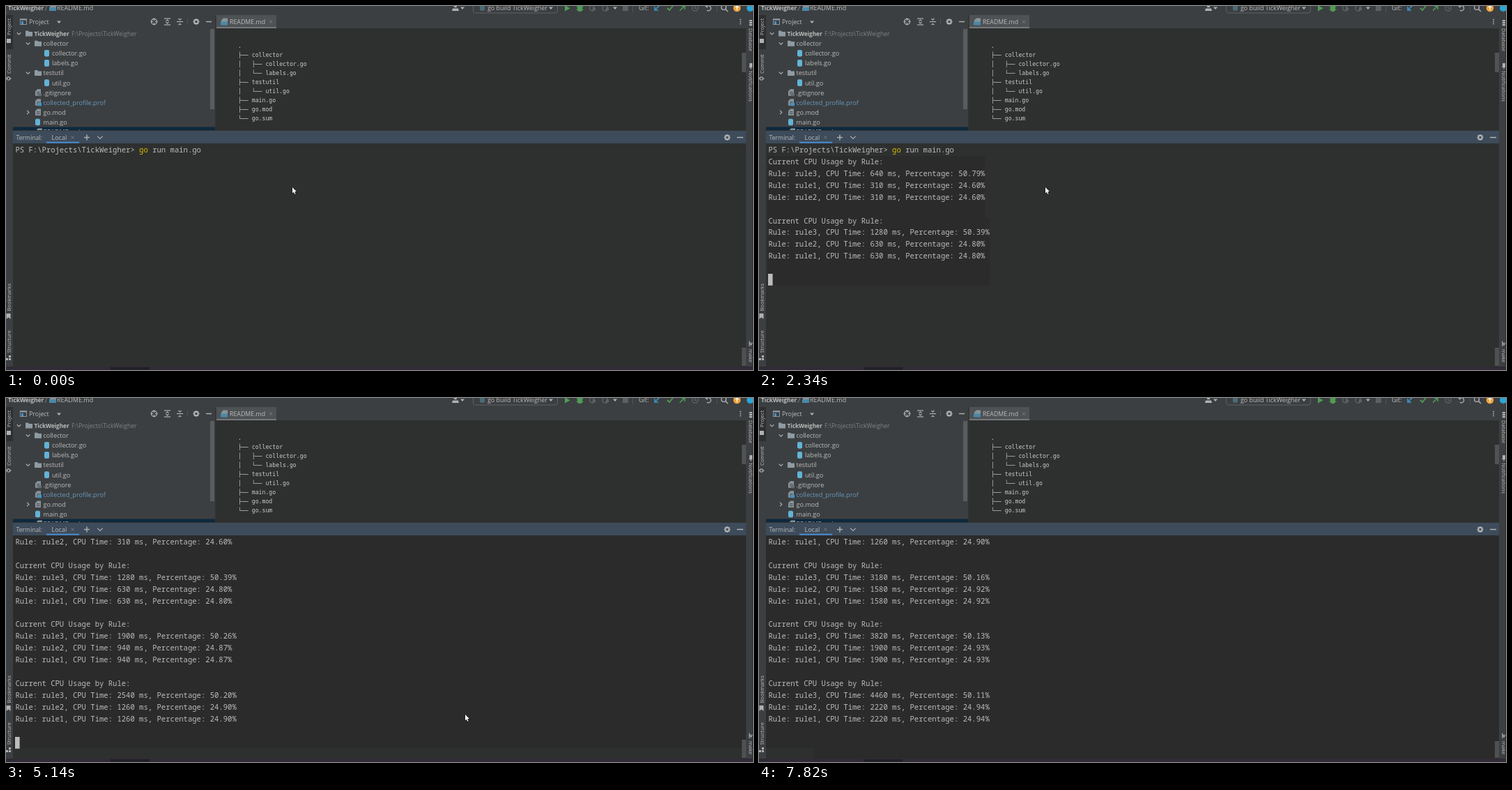
Write an HTML page with a canvas that moves like this. It is 1072 by 522 pixels and loops after 8 s.

```html
<!DOCTYPE html>
<html lang="en">
<head>
<meta charset="utf-8">
<title>Terminal run</title>
<style>
html, body { margin: 0; width: 100%; height: 100%; overflow: hidden; background: #3c3f41; }
canvas { display: block; width: 1072px; height: 522px; }
</style>
</head>
<body>
<canvas id="stage"></canvas>
<script>
const W = 1072, H = 522, LOOP = 8000;
const canvas = document.getElementById('stage');
const ratio = window.devicePixelRatio || 1;
canvas.width = W * ratio;
canvas.height = H * ratio;
const c = canvas.getContext('2d');
c.scale(ratio, ratio);

const UI = '"Open Sans", "Noto Sans", sans-serif';
const MONO = '"Noto Sans Mono", "DejaVu Sans Mono", monospace';
const TREE = '"DejaVu Sans Mono", monospace';
const NAME = 'TickWeigher';
const PANEL = '#3c3f41', BASE = '#2e302f', DARK = '#2b2b2b';
const TEXT = '#bbbbbb', ICON = '#afb1b3', DIM = '#616466';
const BLUE = '#3d94c9', GREEN = '#4f9d55';

// Timeline in ms
const blocks = [1480, 2340, 3320, 4420, 5270, 6270, 7270];
const blinks = [150, 610, 1200, 1910, 2340, 3870, 4420, 5870, 6270, 7820];
const pointer = [
  [0, 411, 260], [3740, 452, 297], [3870, 540, 458], [4000, 562, 460],
  [4270, 563, 459], [4420, 584, 459], [4540, 604, 459], [4690, 610, 459],
  [4840, 612, 459], [5140, 659, 454], [5270, 697, 449], [5420, 729, 443],
  [5570, 735, 441], [5720, 757, 439]
];
const POINTER_END = 5870;
// Areas repainted in the darker shade: time, left, top, right, bottom
const repaints = [
  [1480, 13, 215, 325, 316], [2340, 13, 304, 331, 401], [3320, 13, 384, 331, 486],
  [3740, 411, 259, 459, 307], [3870, 13, 296, 547, 486], [4420, 10, 197, 1062, 502],
  [5270, 78, 502, 1062, 517]
];

function rect(x, y, w, h, color) {
  c.fillStyle = color;
  c.fillRect(x, y, w, h);
}

function round(x, y, w, h, r, color) {
  c.fillStyle = color;
  c.beginPath();
  c.roundRect(x, y, w, h, r);
  c.fill();
}

function trace(p) {
  c.beginPath();
  for (let i = 0; i < p.length; i += 2) c.lineTo(p[i], p[i + 1]);
}

function line(p, color = ICON, width = 1.2) {
  trace(p);
  c.strokeStyle = color;
  c.lineWidth = width;
  c.stroke();
}

function poly(p, color = ICON) {
  trace(p);
  c.fillStyle = color;
  c.fill();
}

function disc(x, y, r, color = ICON) {
  c.beginPath();
  c.arc(x, y, r, 0, 7);
  c.fillStyle = color;
  c.fill();
}

function ring(x, y, r, color = ICON, width = 1.2, from = 0, to = 2 * Math.PI) {
  c.beginPath();
  c.arc(x, y, r, from, to);
  c.strokeStyle = color;
  c.lineWidth = width;
  c.stroke();
}

function text(s, x, y, size = 9.1, color = TEXT, family = UI, weight = 400) {
  c.font = `${weight} ${size}px ${family}`;
  c.fillStyle = color;
  c.fillText(s, x, y);
}

function sideText(s, x, y, turn, color = TEXT) {
  c.save();
  c.translate(x, y);
  c.rotate(turn * Math.PI / 2);
  text(s, 0, 0, 7.5, color);
  c.restore();
}

function chevron(x, y, r, down, color = ICON) {
  line(down ? [x - r, y - r / 2, x, y + r / 2, x + r, y - r / 2]
            : [x - r / 2, y - r, x + r / 2, y, x - r / 2, y + r], color);
}

function caret(x, y) {
  poly([x - 3, y - 1.5, x + 3, y - 1.5, x, y + 2]);
}

function cross(x, y) {
  line([x - 2, y - 2, x + 2, y + 2], '#7f8487', 0.9);
  line([x + 2, y - 2, x - 2, y + 2], '#7f8487', 0.9);
}

function gear(x, y) {
  ring(x, y, 2.7, ICON, 2);
  for (let i = 0; i < 8; i++) {
    const a = i * Math.PI / 4, u = Math.cos(a), v = Math.sin(a);
    line([x + 3 * u, y + 3 * v, x + 4.6 * u, y + 4.6 * v], ICON, 1.5);
  }
}

function folder(x, y) {
  poly([x, y - 4, x + 4, y - 4, x + 5.2, y - 2.6, x + 10, y - 2.6, x + 10, y + 4, x, y + 4], '#8f9ba3');
}

function page(x, y, badge) {
  poly([x + 3, y - 5, x + 8, y - 5, x + 8, y + 4.5, x, y + 4.5, x, y - 2], '#87939a');
  line([x + 2, y - 0.5, x + 6.5, y - 0.5], PANEL, 0.9);
  line([x + 2, y + 2, x + 6.5, y + 2], PANEL, 0.9);
  if (badge) rect(x + 4, y + 0.5, 5, 4.5, badge);
}

function codeFile(x, y, color = '#62b3d6') {
  round(x, y - 4.8, 7, 9.6, 2, color);
}

function docFile(x, y) {
  poly([x + 4, y - 5, x + 10, y - 5, x + 10, y + 1, x + 1, y + 1, x + 1, y - 2], '#87939a');
  rect(x, y, 10, 5, '#4a88a8');
}

function toolbar() {
  text(NAME, 3, 6, 8.4, TEXT, UI, 700);
  line([56, 7, 59, -1], '#777a7c', 1);
  docFile(62, 2);
  text('README.md', 73, 6, 9);

  disc(645, 0, 2.3);
  poly([640, 7, 641, 3.5, 649, 3.5, 650, 7]);
  caret(655, 3);
  c.beginPath();
  c.roundRect(670.5, -8, 121, 18, 3);
  c.strokeStyle = '#5e6163';
  c.lineWidth = 1;
  c.stroke();
  codeFile(680, 2, '#4c6a76');
  text('go build ' + NAME, 691, 6.3, 8.9);
  caret(782, 3);

  poly([802, -1, 802, 7.5, 809.5, 3.2], GREEN);
  round(820, -1, 7, 9, 3, GREEN);
  line([818.5, 1, 828.5, 1], GREEN);
  line([818.5, 5, 828.5, 5], GREEN);
  ring(841, 3, 3.5, DIM, 1.4);
  poly([842, 1, 842, 8, 847, 4.5], DIM);
  ring(860, 3, 4, DIM, 1.4);
  poly([861, 1, 861, 8, 866, 4.5], DIM);
  caret(874, 3);
  rect(885, 0, 8, 7, '#5d6062');
  line([899.5, 0, 899.5, 9], '#505355', 1);
  text('Git:', 908, 6, 9);
  line([938, -1, 931, 6], BLUE, 1.6);
  line([931, 1, 931, 6, 936, 6], BLUE, 1.6);
  line([949, 3, 952, 6, 957, 0], GREEN, 1.8);
  line([967, 6.5, 974, -0.5], GREEN, 1.6);
  line([969, 0, 974, 0, 974, 5], GREEN, 1.6);
  ring(989, 3, 4.2, DIM);
  line([989, 0, 989, 3.5, 991.5, 3.5], DIM);
  ring(1008, 3.2, 3.6, ICON, 1.3, -1.7, 2.2);
  line([1004, 0, 1008, 0], ICON, 1.3);
  poly([1003, 0, 1006.5, -3, 1006.5, 3]);
  line([1020.5, 0, 1020.5, 9], '#505355', 1);
  ring(1030, 2, 3.4, ICON, 1.4);
  line([1032.5, 4.5, 1036, 8], ICON, 1.4);
  disc(1049, 3, 5.3, '#eda33b');
  line([1049, 6, 1049, 0], '#ffffff', 1.2);
  line([1046.8, 2, 1049, 0, 1051.2, 2], '#ffffff', 1.2);
  disc(1068, 3, 5, '#2aa5d8');
}

function sidebars() {
  rect(0, 13, 10, 49, '#2d2f30');
  sideText('Project', 6.5, 42, -1);
  rect(1, 47, 6, 6, ICON);
  sideText('Commit', 6.5, 97, -1);
  ring(3.5, 104, 2.2);
  line([0, 104, 1.3, 104]);
  line([5.7, 104, 7.5, 104]);
  sideText('Bookmarks', 6.5, 437.5, -1);
  poly([0.5, 441, 6.5, 441, 6.5, 449, 3.5, 446.5, 0.5, 449]);
  sideText('Structure', 6.5, 497.5, -1);
  rect(4, 501, 3, 3, ICON);
  rect(0, 505, 3, 3, ICON);
  rect(4, 505, 3, 3, ICON);

  for (let i = 0; i < 3; i++) round(1066.5, 20 + i * 3, 5, 2.3, 1, ICON);
  sideText('Database', 1066, 32, 1);
  poly([1066, 88, 1067, 86, 1067, 82, 1071, 82, 1071, 86, 1072, 88]);
  disc(1069, 89.3, 1);
  sideText('Notifications', 1066, 93, 1);
  line([1067, 488, 1067, 482, 1069.2, 486, 1071.4, 482], ICON, 1.2);
  sideText('make', 1066, 492, 1);
  rect(1071, 10, 1, 507, '#2b2d30');
}

function projectPanel() {
  c.strokeStyle = '#87939a';
  c.lineWidth = 1;
  c.strokeRect(20.5, 18.5, 9, 8);
  rect(20, 18, 10, 2.5, '#87939a');
  rect(22, 22, 3, 4, BLUE);
  text('Project', 33, 26, 8.9);
  caret(76, 23);
  ring(212.5, 22.5, 4, ICON, 1.3);
  line([212.5, 17.5, 212.5, 21]);
  line([212.5, 24, 212.5, 27.5]);
  line([207.5, 22.5, 211, 22.5]);
  line([214, 22.5, 217.5, 22.5]);
  line([227, 18, 236, 18]);
  line([227, 27, 236, 27]);
  chevron(231.5, 24, 2, true);
  line([229.5, 21.5, 231.5, 20, 233.5, 21.5]);
  line([245, 22.5, 254, 22.5]);
  chevron(249.5, 19, 2, true);
  line([247.5, 27, 249.5, 25.5, 251.5, 27]);
  line([260.5, 18, 260.5, 27], '#505355', 1);
  gear(273, 22.5);
  line([287, 22.5, 295, 22.5], ICON, 1.4);

  c.save();
  c.beginPath();
  c.rect(10, 32, 290, 146);
  c.clip();
  rect(10, 173.5, 290, 14, '#0d293e');
  const rowY = i => 39.6 + i * 14.1;
  const label = (i, s, x, color) => text(s, x, rowY(i) + 3.4, 9.1, color);
  chevron(18.5, rowY(0), 2.8, true);
  folder(28, rowY(0));
  text(NAME, 40.5, rowY(0) + 3.4, 8.2, TEXT, UI, 700);
  text('F:\\Projects\\' + NAME, 94, rowY(0) + 3.4, 8.6, '#808284');
  [[1, 'collector'], [4, 'testutil']].forEach(([i, s]) => {
    chevron(31.5, rowY(i), 2.8, true);
    folder(41, rowY(i));
    label(i, s, 53.5);
  });
  [[2, 'collector.go'], [3, 'labels.go'], [5, 'util.go']].forEach(([i, s]) => {
    codeFile(55, rowY(i));
    label(i, s, 66);
  });
  page(42, rowY(6), '#666d72');
  label(6, '.gitignore', 53.5);
  page(42, rowY(7), BLUE);
  label(7, 'collected_profile.prof', 53.5, '#6897bb');
  chevron(31.5, rowY(8), 2.8, false);
  page(42, rowY(8));
  label(8, 'go.mod', 53.5);
  codeFile(42, rowY(9));
  label(9, 'main.go', 53.5);
  docFile(42, rowY(10));
  label(10, 'README.md', 53.5);
  rect(293, 33, 6, 115, '#5a5d5e');
  c.restore();
}

function editor() {
  rect(300, 13, 1.5, 165, '#323435');
  rect(302, 13, 86, 19, '#4e5254');
  rect(302, 30, 86, 2, '#75797d');
  docFile(308, 22.5);
  text('README.md', 321, 26, 8.8);
  cross(380, 22.5);
  for (let i = -1; i < 2; i++) disc(1054, 22.5 + i * 3, 0.9);
  rect(301, 32, 761, 146, BASE);
  rect(1056, 67, 6, 28, '#515353');
  [
    '.', '├── collector', '│   ├── collector.go', '│   └── labels.go',
    '├── testutil', '│   └── util.go', '├── main.go', '├── go.mod', '└── go.sum'
  ].forEach((s, i) => text(s, 333, 59.5 + i * 13, 8.2, '#c8cacb', TREE));
}

function terminalHead() {
  rect(10, 178, 1052, 1, '#323435');
  rect(10, 179, 1052, 18, '#3d4b5a');
  text('Terminal:', 14.5, 191.7, 8.7);
  rect(58, 194.6, 47, 2.2, '#4a88c7');
  text('Local', 65.5, 191.7, 9);
  cross(95.5, 188.5);
  line([112, 188.5, 120, 188.5], ICON, 1.4);
  line([116, 184.5, 116, 192.5], ICON, 1.4);
  chevron(135, 188.5, 3.8, true);
  gear(1035, 188.5);
  line([1049, 188.5, 1058, 188.5], ICON, 1.5);
}

function report(n) {
  const heavy = 640 * n - (n > 2 ? 20 : 0);
  const light = 320 * n - (n > 2 ? 20 : 10);
  const row = (id, ms) => `Rule: rule${id}, CPU Time: ${ms} ms, Percentage: ` +
    `${(100 * ms / (heavy + 2 * light)).toFixed(2)}%`;
  const order = n === 1 ? [1, 2] : [2, 1];
  return ['Current CPU Usage by Rule:', row(3, heavy), ...order.map(id => row(id, light)), ''];
}

function terminal(t) {
  const pitch = 16.92, top = 198.1, lastRow = 17;
  const prompt = `PS F:\\Projects\\${NAME}> `;
  rect(10, 197, 1052, 320, BASE);
  for (const [at, l, u, r, b] of repaints) if (t >= at) rect(l, u, r - l, b - u, DARK);

  const lines = [prompt];
  const count = blocks.filter(at => t >= at).length;
  for (let n = 1; n <= count; n++) lines.push(...report(n));
  const scroll = Math.max(0, lines.length - lastRow);
  lines.slice(scroll).forEach((s, i) => text(s, 13.4, top + 11.9 + i * pitch, 10.58, TEXT, MONO));
  if (!scroll) {
    const x = 13.4 + c.measureText(prompt).width;
    text('go', x, top + 11.9, 10.58, '#d9bb00', MONO);
    text(' run main.go', x + c.measureText('go').width, top + 11.9, 10.58, TEXT, MONO);
  }
  if (blinks.filter(at => t >= at).length % 2) {
    rect(13, Math.round(top + (lines.length - scroll) * pitch), 6.6, 16.8, '#bcbcbc');
  }
  const thumb = t < 7270 ? 490 : 492;
  rect(1056, thumb, 6, 516 - thumb, '#4f5151');
}

function mouse(t) {
  if (t >= POINTER_END) return;
  const [, x, y] = pointer.filter(p => t >= p[0]).pop();
  const p = [0, 0, 0, 8.6, 1.9, 6.8, 3.2, 9.8, 4.6, 9.2, 3.3, 6.3, 6, 6.1, 0, 0];
  const shape = p.map((v, i) => v + (i % 2 ? y : x));
  line(shape, '#141414', 1.2);
  poly(shape, '#ffffff');
}

function draw(t) {
  rect(0, 0, W, H, PANEL);
  toolbar();
  sidebars();
  projectPanel();
  editor();
  terminalHead();
  terminal(t);
  rect(0, 517, W, 5, '#302b36');
  rect(150, 518, 56, 4, '#231f29');
  mouse(t);
}

let start;
function tick(now) {
  start ??= now;
  draw((now - start) % LOOP);
  requestAnimationFrame(tick);
}
draw(0);
requestAnimationFrame(tick);
</script>
</body>
</html>
```
